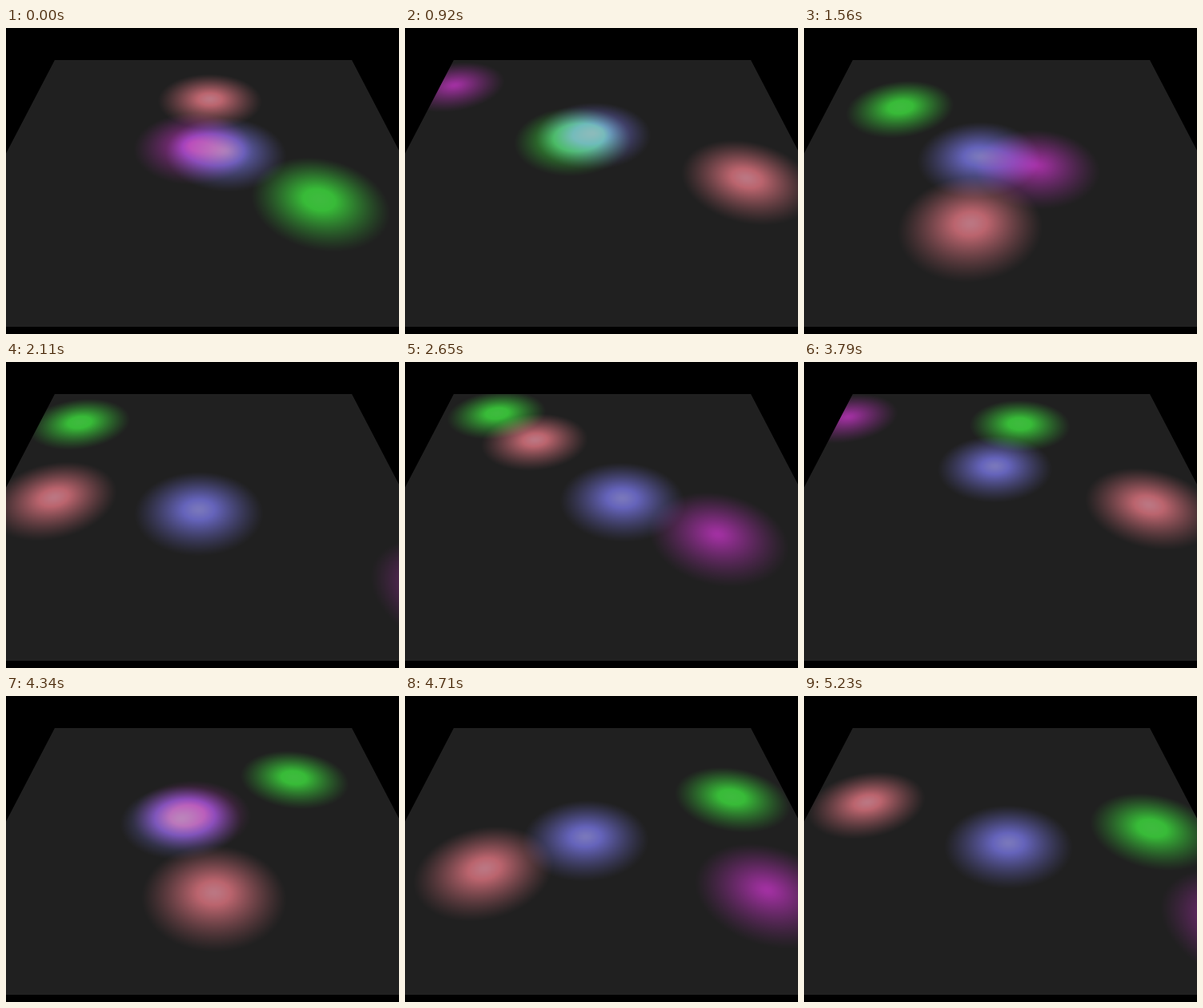
Write an HTML page with a canvas that moves like this. It is 491x382 px and loops after 5330 ms.

```html
<!DOCTYPE html>
<html lang="en">
<head>
<meta charset="utf-8">
<title>Four lights on a floor</title>
<style>
  html, body { margin: 0; width: 100%; height: 100%; overflow: hidden; background: #000; }
  canvas { display: block; width: 491px; height: 382px; }
</style>
</head>
<body>
<canvas id="stage" width="491" height="382"></canvas>
<script>
const W = 491, H = 382, LOOP = 5330, STEPS = 95;
const FLOOR = { top: 40, bottom: 373, centre: 246, horizon: -316, slope: 0.522 };
const BASE = 32, CEILING = 187;
const RADIUS = 0.31;

const ctx = document.getElementById('stage').getContext('2d');
const image = ctx.createImageData(W, H);
const rad = deg => deg * Math.PI / 180;

// Floor coordinates run from -1 to 1 both ways; v = 1 is the near edge.
const scaleAt = y => FLOOR.slope * (y - FLOOR.horizon);
const depthAt = y => 3.139 - 770 / scaleAt(y);
const rowOf = v => 770 / (3.139 - v) / FLOOR.slope + FLOOR.horizon;

const lights = [
  { color: [98, 96, 220], at: a => [0.115 * Math.cos(a), 0.005 - 0.185 * Math.sin(a)] },
  { color: [215, 95, 108], at: a => [0.75 * Math.sin(a), -0.51 * Math.cos(a)] },
  { color: [142, 18, 142], at: a => [-Math.sin(a), -0.015 - 0.72 * Math.sin(a)] },
  { color: [33, 215, 33], at: (a, t) => [
    0.76 * Math.cos(rad(46.4 + 61.75 * t)),
    -0.01 + 0.75 * Math.cos(rad(61 + 41.2 * t))
  ] }
];

const glow = new Float32Array(W * H * 3);

function addLight({ color, at }, angle, seconds) {
  const [u, v] = at(angle, seconds);
  const y0 = Math.max(FLOOR.top, Math.floor(rowOf(v - RADIUS)));
  const y1 = Math.min(FLOOR.bottom - 1, Math.ceil(rowOf(v + RADIUS)));
  for (let y = y0; y <= y1; y++) {
    const scale = scaleAt(y), dv = (depthAt(y) - v) / RADIUS;
    const mid = FLOOR.centre + u * scale, reach = RADIUS * scale;
    const x0 = Math.max(0, Math.floor(mid - reach));
    const x1 = Math.min(W - 1, Math.ceil(mid + reach));
    for (let x = x0; x <= x1; x++) {
      const du = (x - mid) / reach;
      const r = Math.sqrt(du * du + dv * dv + 0.006);
      if (r >= 1) continue;
      const power = Math.pow(1 - r, 1.2), i = (y * W + x) * 3;
      for (let c = 0; c < 3; c++) glow[i + c] += color[c] * power;
    }
  }
}

function render(ms) {
  const seconds = ms / 1000, angle = rad(3 + 123.5 * seconds);
  glow.fill(BASE);
  lights.forEach(light => addLight(light, angle, seconds));
  for (let y = 0; y < H; y++) {
    const onFloor = y >= FLOOR.top && y < FLOOR.bottom;
    const half = scaleAt(y);
    for (let x = 0; x < W; x++) {
      const i = y * W + x;
      const edge = half - Math.abs(x - FLOOR.centre) + 0.5;
      const cover = onFloor ? Math.max(0, Math.min(1, edge)) : 0;
      for (let c = 0; c < 3; c++) {
        image.data[i * 4 + c] = cover * Math.min(CEILING, glow[i * 3 + c]);
      }
      image.data[i * 4 + 3] = 255;
    }
  }
  ctx.putImageData(image, 0, 0);
}

const start = performance.now();
let shown = -1;

function tick() {
  const ms = Math.max(0, performance.now() - start) % LOOP;
  const step = Math.floor(ms / LOOP * STEPS + 0.1);
  if (step !== shown) {
    shown = step;
    render(step * LOOP / STEPS);
  }
  requestAnimationFrame(tick);
}
tick();
</script>
</body>
</html>
```
